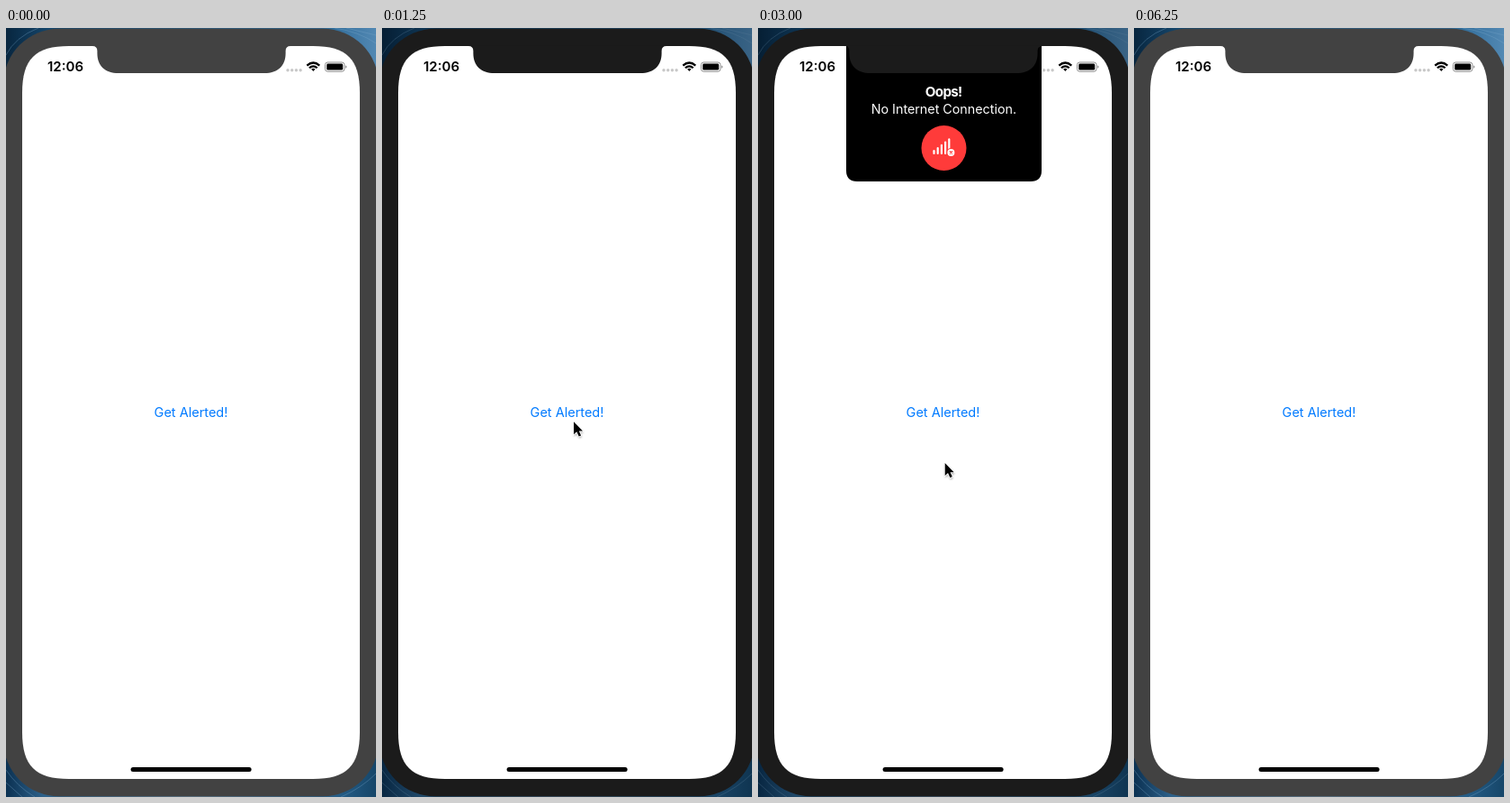
An HTML page for the animation above (6500 ms loop, 411 px wide and 852 px high).

```html
<!DOCTYPE html>
<html lang="en">
<head>
<meta charset="utf-8">
<title>Alert demo</title>
<style>
  html, body { margin: 0; width: 100%; height: 100%; overflow: hidden; background: #12334f; }
  svg { display: block; width: 411px; height: 852px; }
  text { font-family: Inter, Roboto, sans-serif; text-anchor: middle; }
</style>
</head>
<body>
<svg viewBox="0 0 411 852" xmlns="http://www.w3.org/2000/svg">
  <defs>
    <linearGradient id="topSky">
      <stop offset="0" stop-color="#08263f"/>
      <stop offset=".12" stop-color="#15476d"/>
      <stop offset=".5" stop-color="#285b80"/>
      <stop offset=".88" stop-color="#316d9a"/>
      <stop offset="1" stop-color="#5288b3"/>
    </linearGradient>
    <linearGradient id="bottomSky">
      <stop offset="0" stop-color="#0b3152"/>
      <stop offset=".1" stop-color="#2d618a"/>
      <stop offset=".5" stop-color="#60788c"/>
      <stop offset=".9" stop-color="#255d87"/>
      <stop offset="1" stop-color="#164669"/>
    </linearGradient>
    <filter id="soft" x="-50%" y="-50%" width="200%" height="200%">
      <feGaussianBlur stdDeviation="1"/>
    </filter>
    <clipPath id="screenClip"><path class="screen"/></clipPath>
    <path id="arrow" d="M0 0V14L3.3 11L5.7 16.2L8.1 15.1L5.8 10.2H10Z"/>
  </defs>

  <rect width="411" height="426" fill="url(#topSky)"/>
  <rect y="426" width="411" height="426" fill="url(#bottomSky)"/>
  <g fill="none" stroke="#78a5c8" stroke-opacity=".35">
    <path d="M0 30Q10 10 36 0M365 0Q392 4 411 17M378 0L411 8"/>
    <path d="M0 822Q12 840 32 852M0 836L18 852M411 826Q395 842 372 852"/>
  </g>
  <rect id="shade" width="411" height="852" fill="#00101c" opacity=".3"/>

  <rect class="body" x="-3" y=".7" width="417" height="850.6" rx="62"/>
  <path class="screen" fill="#fff"/>

  <g clip-path="url(#screenClip)">
    <text x="66" y="48.3" font-size="15" font-weight="600">12:06</text>
    <g fill="#c8c8c8">
      <circle cx="313" cy="46.8" r="1.7"/>
      <circle cx="317.7" cy="46.8" r="1.7"/>
      <circle cx="322.4" cy="46.8" r="1.7"/>
      <circle cx="327.1" cy="46.8" r="1.7"/>
    </g>
    <g fill="none" stroke="#000" stroke-width="2.2">
      <path d="M334.3 41.6Q341.3 35.4 348.3 41.6M336.9 44.3Q341.3 40.4 345.7 44.3"/>
      <path d="M339.1 45.6Q341.3 43.9 343.5 45.6L341.3 48Z" fill="#000" stroke="none"/>
    </g>
    <rect x="354.5" y="38" width="21.4" height="10.2" rx="2.7" fill="none" stroke="#8c8c8c"/>
    <rect x="356.2" y="39.6" width="18" height="7" rx="1.4"/>
    <path d="M377.1 41.4Q378.5 41.8 378.5 43.1T377.1 44.8Z" fill="#8c8c8c"/>

    <text id="button" x="205.5" y="431.3" font-size="14.5" fill="#007aff">Get Alerted!</text>
    <rect x="138.6" y="819" width="134" height="5" rx="2.5"/>

    <g id="alert">
      <path id="panel"/>
      <g id="content" fill="#fff">
        <text x="206.2" y="76.3" font-size="15.2" font-weight="700" letter-spacing="-.7">Oops!</text>
        <text x="206.4" y="95.3" font-size="14.3">No Internet Connection.</text>
        <circle cx="206.5" cy="133" r="25" fill="#ff3b3a"/>
        <g id="bars" stroke="#fff" stroke-width="2.2" stroke-linecap="round"/>
        <circle cx="214.4" cy="138" r="5" fill="#ff3b3a"/>
        <circle cx="214.4" cy="138" r="4"/>
        <path d="M212.9 136.5l3 3m0-3l-3 3" stroke="#ff3b3a" stroke-width="1.3"/>
      </g>
    </g>
  </g>
  <path class="body" d="M96 19.5V20Q101.4 20 101.4 25.5V28C101.4 42 110 50 125 50H287C302 50 310.6 42 310.6 28V25.5Q310.6 20 316 20V19.5Z"/>

  <g id="cursor">
    <use href="#arrow" x=".4" y="1.6" stroke="#000" opacity=".35" filter="url(#soft)"/>
    <use href="#arrow" fill="#000" stroke="#fff" stroke-width="1.8" paint-order="stroke"/>
  </g>
</svg>
<script>
  const LOOP = 6500;
  const $ = id => document.getElementById(id);
  const all = selector => document.querySelectorAll(selector);
  const show = (node, on) => node.setAttribute('display', on ? 'inline' : 'none');
  const move = (node, x, y) => node.setAttribute('transform', `translate(${x} ${y})`);

  // Rounded rectangle whose corners ease gradually into the sides.
  function smoothRect(l, t, r, b, span, handle) {
    const k = span * (1 - handle);
    return `M${l} ${t + span}C${l} ${t + k} ${l + k} ${t} ${l + span} ${t}` +
      `H${r - span}C${r - k} ${t} ${r} ${t + k} ${r} ${t + span}` +
      `V${b - span}C${r} ${b - k} ${r - k} ${b} ${r - span} ${b}` +
      `H${l + span}C${l + k} ${b} ${l} ${b - k} ${l} ${b - span}Z`;
  }

  for (const path of all('.screen'))
    path.setAttribute('d', smoothRect(18, 20, 393, 832, 52, .72));

  for (let i = 0; i < 5; i++) {
    const bar = document.createElementNS('http://www.w3.org/2000/svg', 'path');
    const x = 195.5 + 4.2 * i;
    bar.setAttribute('d', `M${x} 139V${136.2 - 3.2 * i}`);
    $('bars').append(bar);
  }

  // Cursor positions: start time, x, y.
  const stops = [
    [250, 386.5, 253.5], [500, 308, 276.7], [750, 229.5, 386],
    [1000, 212.6, 431], [1250, 213, 436.3], [1500, 212.7, 457], [1750, 207.7, 482]
  ];

  function draw(t) {
    const focused = t >= 500 && t < 6250;
    for (const node of all('.body')) node.setAttribute('fill', focused ? '#1b1b1b' : '#424242');
    show($('shade'), focused);

    show($('cursor'), t >= 250 && t < 5750);
    const stop = stops.filter(s => s[0] <= t).pop();
    if (stop) move($('cursor'), stop[1], stop[2]);

    const entering = t >= 1500 && t < 1750;
    const bottom = entering ? 173.7 : 170;
    show($('alert'), t >= 1500 && t < 5000);
    $('panel').setAttribute('d',
      `M98 20H315V${bottom - 12}Q315 ${bottom} 303 ${bottom}H110Q98 ${bottom} 98 ${bottom - 12}Z`);
    move($('content'), 0, entering ? -81 : 0);

    $('button').setAttribute('opacity', entering ? .46 : t >= 1750 && t < 2000 ? .94 : 1);
  }

  const start = performance.now();
  function tick() {
    draw((performance.now() - start) % LOOP);
    requestAnimationFrame(tick);
  }
  tick();
</script>
</body>
</html>
```
